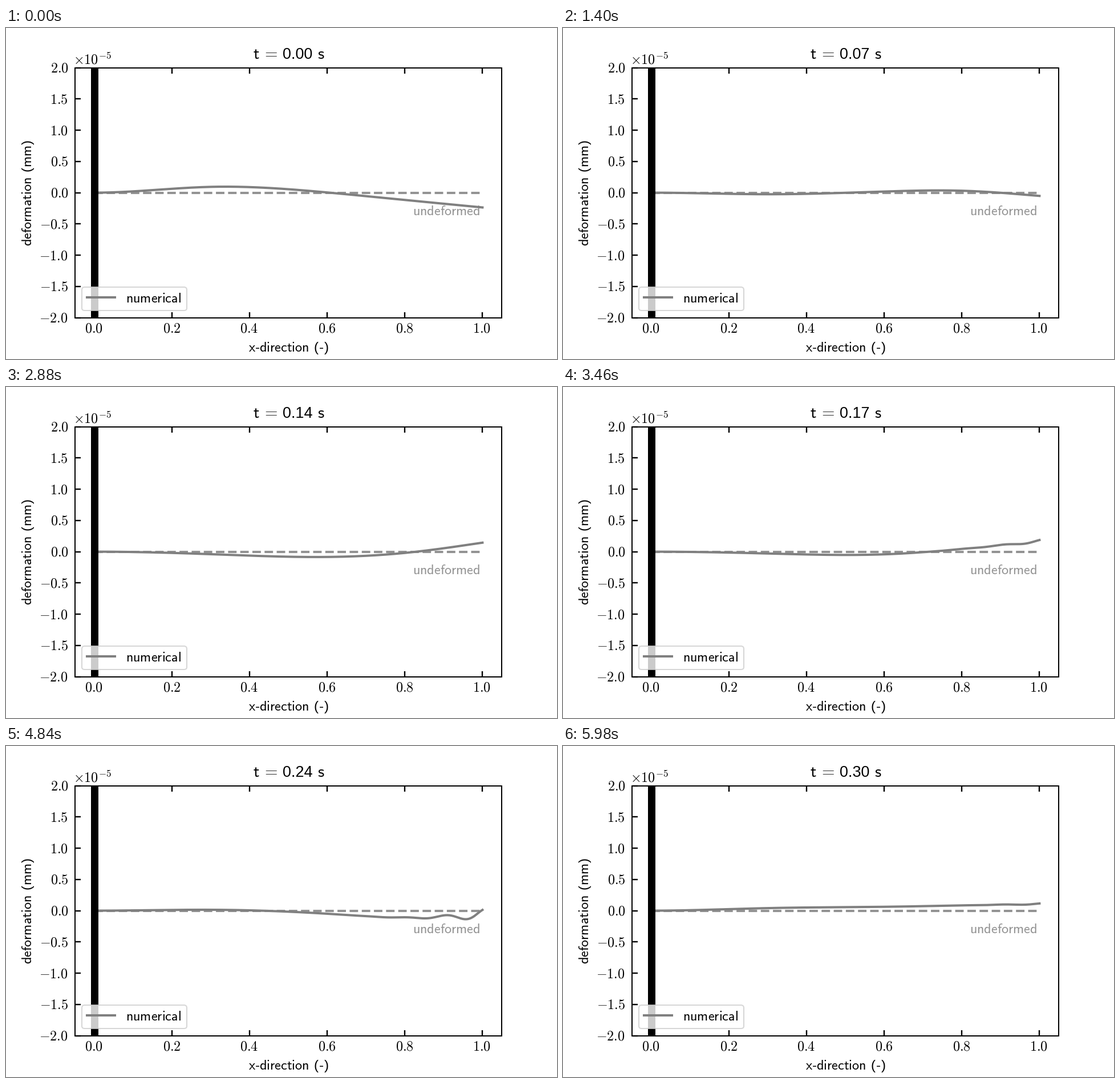
A matplotlib script that plays this animation: 966x580 px, repeating every 6 s.

```python
import numpy as np
import matplotlib.pyplot as plt
from matplotlib.animation import FuncAnimation

W, H, DPI = 966, 580, 144
FRAMES, STEP = 300, 20
SIZE, LINE = 12.08, 2.01

plt.rcParams.update({"mathtext.fontset": "cm", "font.family": "Liberation Sans",
                     "font.size": SIZE, "axes.linewidth": 1})


def spline(x, y, q, clamped=False):
    """Cubic spline along the first axis of y; optional zero slope at the start."""
    n, h = len(x), np.diff(x)
    slope = np.diff(y, axis=0) / h[:, None]
    a, r = np.eye(n), np.zeros_like(y)
    for i in range(1, n - 1):
        a[i, i - 1:i + 2] = h[i - 1], 2 * (h[i - 1] + h[i]), h[i]
        r[i] = 6 * (slope[i] - slope[i - 1])
    if clamped:
        a[0, :2] = 2 * h[0], h[0]
        r[0] = 6 * slope[0]
    m = np.linalg.solve(a, r)
    k = np.clip(np.searchsorted(x, q) - 1, 0, n - 2)
    hk = h[k][:, None]
    u = (x[k + 1] - q)[:, None] / hk
    v = 1 - u
    return (u * y[k] + v * y[k + 1]
            + ((u**3 - u) * m[k] + (v**3 - v) * m[k + 1]) * hk**2 / 6)


def beam_motion(x, t):
    """Deflection in pixels: slow bending, sharp tip dips and a growing ripple."""
    knots = np.array([0, .3, .6, .8, 1])
    poses = {
        0: (0, 10.2, .5, -12.4, -25),
        37: (0, 9.4, 12, 3.8, -12),
        104: (0, -12, -11.7, -3, 1.8),
        144: (0, -4.4, -9.2, -2, 16.3),
        202: (0, -3.7, -3.2, 4.6, 9.8),
        242: (0, 1.6, -5.3, -12, -7),
        299: (0, 4.5, 6.8, 9.2, 11.6),
    }
    shapes = spline(knots, np.array(list(poses.values())).T, x, clamped=True)
    y = spline(np.array(list(poses)), shapes.T, t)
    t = t[:, None]
    for when, depth in (14, -10), (125, -41), (223, -47), (267, -32):
        y += depth * np.exp(-((t - when) / 9)**2) * x**4
    swell = 10 * (t / 242)**3 * np.cos(2 * np.pi * (t - 202) / 77)
    return y + swell * x**12 * np.cos(2 * np.pi * (x - .955) / .105)


def label(px, py, s, size=SIZE, **kw):
    kw = {"ha": "left", "va": "baseline", **kw}
    return fig.text(px / W, 1 - py / H, s, fontsize=size, **kw)


def sans(s):
    """Sans text in math mode, with brackets and hyphens from the text font."""
    for c in "()\u2010":
        pad = "" if c == "\u2010" else r"\hspace{.03}"
        s = s.replace(c, pad + r"\mathregular{" + c + "}" + pad)
    return r"$\mathsf{" + s.replace(" ", r"\hspace{.38}") + "}$"


def bearing(s):
    return 2 if s[0] in "1-" else 1


fig = plt.figure(figsize=(W / DPI, H / DPI), dpi=DPI, facecolor="white")
ax = fig.add_axes([.125, .125, .775, .755])
ax.set(xlim=(-.05, 1.05), ylim=(-2, 2),
       xticks=np.arange(6) / 5, yticks=np.arange(-4, 5) / 2)
ax.tick_params(direction="in", top=True, length=5, width=1.2,
               labelbottom=False, labelleft=False)

# Beam, rest line, clamp and legend
x = np.linspace(0, 1, 201)
unit = .755 * H / 4
motion = beam_motion(x, np.arange(FRAMES)) / unit
beam, = ax.plot(x, motion[0], color="gray", lw=LINE, zorder=2,
                label=sans("numerical"))
ax.plot([0, 1], [0, 0], "--", color="gray", alpha=.85, lw=LINE, zorder=2.1)
ax.axvline(0, color="black", lw=6.5, zorder=2.2)
ax.legend(loc="lower left")

# Texts
for px, v in zip(ax.transData.transform([(v, 0) for v in ax.get_xticks()])[:, 0],
                 ax.get_xticks()):
    s = f"{v:.1f}"
    label(px - bearing(s) + .5, 533.5, f"${s}$", ha="center")
for py, v in zip(ax.transData.transform([(0, v) for v in ax.get_yticks()])[:, 1],
                 ax.get_yticks()):
    s = f"{v:.1f}"
    label(111 - bearing(s), H - py + 8, f"${s}$", ha="right")
label(118.5, 63, r"$\times10^{-5}$")
label(495, 567.5, sans("x\u2010direction (\u2010)"), ha="center")
label(45, 289, sans("deformation (mm)"), ha="center", rotation=90,
      rotation_mode="anchor")
label(713, 328, sans("undeformed"), color="gray", alpha=.85)

# Title with a running clock
big = 1.2 * SIZE
label(433, 53.5, r"$\mathsf{t\hspace{.18}=}$", big)
clock = label(484.8, 53.5, "0.00", .93 * big)
label(545.7, 53.5, sans("s"), big)


def update(i):
    beam.set_ydata(motion[i])
    clock.set_text(f"{i / 1000:.2f}")
    return beam, clock


anim = FuncAnimation(fig, update, frames=FRAMES, interval=STEP, repeat=True,
                     repeat_delay=0, blit=False)
plt.show()
```
